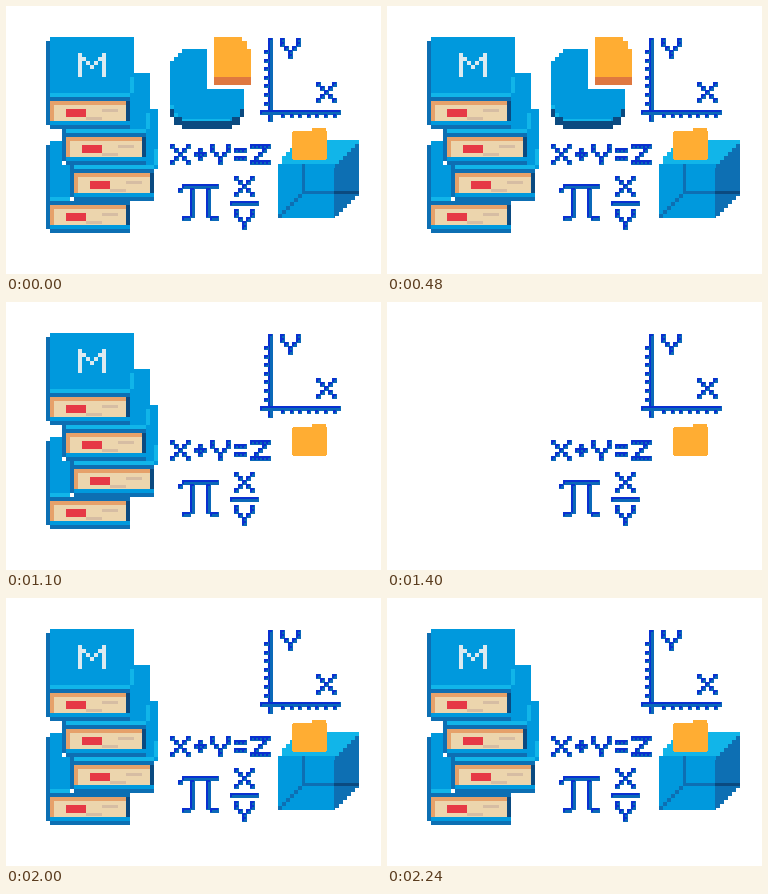
Write an HTML page with a canvas that moves like this. It is 375 px wide and 268 px high and loops after 2.4 s.

```html
<!DOCTYPE html>
<html lang="en">
<head>
<meta charset="utf-8">
<title>Maths icons</title>
<style>
html, body { margin: 0; width: 100%; height: 100%; overflow: hidden; background: #fff; }
canvas { display: block; width: 375px; height: 268px; }
</style>
</head>
<body>
<canvas id="stage" width="375" height="268"></canvas>
<script>
const ctx = document.getElementById('stage').getContext('2d');
const LOOP = 2400;
const CELL = 4;
const BLUE = '#0099dd', CYAN = '#11b5e9', DEEP = '#0d6fb3', NAVY = '#0b4a80';
const INK = '#0a30d0', INK_SHADE = '#0b69b8', ORANGE = '#ffad33';

const GLYPHS = {
  X: ['1...1', '.1.1.', '..1..', '.1.1.', '1...1'],
  Y: ['1...1', '1...1', '.1.1.', '..1..', '..1..'],
  Z: ['11111', '...1.', '..1..', '.1...', '11111'],
  '+': ['...', '.1.', '111', '.1.', '...'],
  '=': ['...', '111', '...', '111', '...'],
  M: ['1.....1', '11...11', '1.1.1.1', '1..1..1', '1.....1', '1.....1']
};

function rect(color, x, y, w, h) {
  ctx.fillStyle = color;
  ctx.fillRect(x, y, w, h);
}

// Blue pen stroke: bright upper-left edge, softer lower-right body.
function ink(x, y, w, h) {
  rect(INK_SHADE, x, y, w + 1, h + 1);
  rect(INK, x, y, w, 2);
  rect(INK, x, y, 2, h);
}

function eachCell(name, draw) {
  GLYPHS[name].forEach((row, j) => {
    [...row].forEach((bit, i) => {
      if (bit === '1') draw(i * CELL, j * CELL);
    });
  });
}

function glyph(name, x, y) {
  eachCell(name, (dx, dy) => ink(x + dx, y + dy, CELL, CELL));
}

function book(x, y) {
  const r = (color, dx, dy, w, h) => rect(color, x + dx, y + dy, w, h);
  r(DEEP, 0, 4, 4, 88);
  r(BLUE, 4, 0, 84, 60);
  r(CYAN, 4, 56, 80, 4);
  r(CYAN, 84, 40, 4, 16);
  r(DEEP, 4, 60, 80, 4);
  r('#e6a16a', 4, 64, 76, 20);
  r('#ecd5ad', 8, 68, 72, 12);
  r('#ecd5ad', 4, 80, 76, 4);
  r('#e6a16a', 4, 80, 4, 4);
  r('#e63946', 20, 72, 20, 8);
  r('#d6bda3', 56, 72, 16, 3);
  r('#d6bda3', 40, 80, 16, 3);
  r(NAVY, 80, 64, 4, 20);
  r(BLUE, 4, 84, 80, 4);
  r(DEEP, 4, 88, 80, 4);
  ctx.clearRect(x, y + 88, 4, 4);
}

function books() {
  book(40, 135);
  book(64, 103);
  book(56, 67);
  book(40, 31);
  eachCell('M', (dx, dy) => rect('#dceaf0', 72 + dx, 47 + dy, CELL, CELL));
}

function pie() {
  rect(NAVY, 176, 115, 50, 8);
  rect(NAVY, 168, 107, 66, 12);
  rect(NAVY, 164, 99, 74, 12);
  rect(BLUE, 176, 43, 25, 72);
  rect(BLUE, 172, 47, 29, 64);
  rect(BLUE, 168, 51, 33, 58);
  rect(BLUE, 164, 55, 37, 48);
  rect(BLUE, 201, 83, 37, 20);
  rect(BLUE, 201, 103, 33, 8);
  rect(BLUE, 201, 111, 25, 4);
  rect(CYAN, 164, 99, 4, 4);
  rect(CYAN, 168, 107, 4, 4);
  rect(CYAN, 176, 113, 48, 2);
  rect(ORANGE, 208, 31, 28, 40);
  rect(ORANGE, 236, 35, 5, 36);
  rect(ORANGE, 241, 43, 4, 28);
  rect('#df7840', 208, 71, 37, 8);
}

function axes() {
  ink(262, 32, 4, 83);
  ink(254, 104, 80, 4);
  for (let i = 0; i < 7; i++) {
    ink(258, Math.round(44 + i * 8.6), 4, 3);
    ink(Math.round(275 + i * 8.6), 108, 3, 3);
  }
  glyph('Y', 274, 32);
  glyph('X', 310, 76);
}

function formulas() {
  glyph('X', 164, 138);
  glyph('+', 188, 138);
  glyph('Y', 204, 138);
  glyph('=', 228, 138);
  glyph('Z', 244, 138);

  ink(176, 178, 36, 4);
  ink(172, 182, 4, 4);
  ink(184, 182, 4, 29);
  ink(200, 182, 4, 29);
  ink(176, 210, 8, 4);
  ink(204, 210, 8, 4);

  glyph('X', 228, 170);
  ink(224, 195, 28, 4);
  glyph('Y', 228, 203);
}

function box() {
  for (let row = 0; row < 20; row++) {
    const y = 134 + row * CELL;
    const h = Math.min(CELL, 212 - y);
    const left = 272 + Math.max(0, 16 - Math.floor(row * 0.75) * CELL);
    const edge = Math.max(328, 353 - row * CELL);
    const right = 353 - Math.max(0, row - 13) * CELL;
    rect(row < 6 ? CYAN : BLUE, left, y, edge - left, h);
    if (right > edge) rect(DEEP, edge, y, right - edge, h);
  }
  rect(DEEP, 296, 158, 3, 28);
  rect(DEEP, 296, 185, 32, 3);
  rect(NAVY, 328, 185, 25, 3);
  for (let i = 0; i < 6; i++) rect(DEEP, 292 - i * CELL, 188 + i * CELL, CELL, CELL);
}

function folder() {
  rect(ORANGE, 306, 122, 14, 4);
  rect(ORANGE, 287, 125, 34, 28);
  rect(ORANGE, 286, 126, 35, 27);
  rect(ORANGE, 287, 153, 33, 1);
}

function frame(now) {
  const t = now % LOOP;
  ctx.clearRect(0, 0, 375, 268);
  if (t < 1400 || t >= 2000) books();
  if (t < 800) pie();
  axes();
  formulas();
  if (t < 1100 || t >= 2000) box();
  folder();
}

const start = performance.now();
function tick() {
  frame(performance.now() - start);
  requestAnimationFrame(tick);
}
tick();
</script>
</body>
</html>
```
